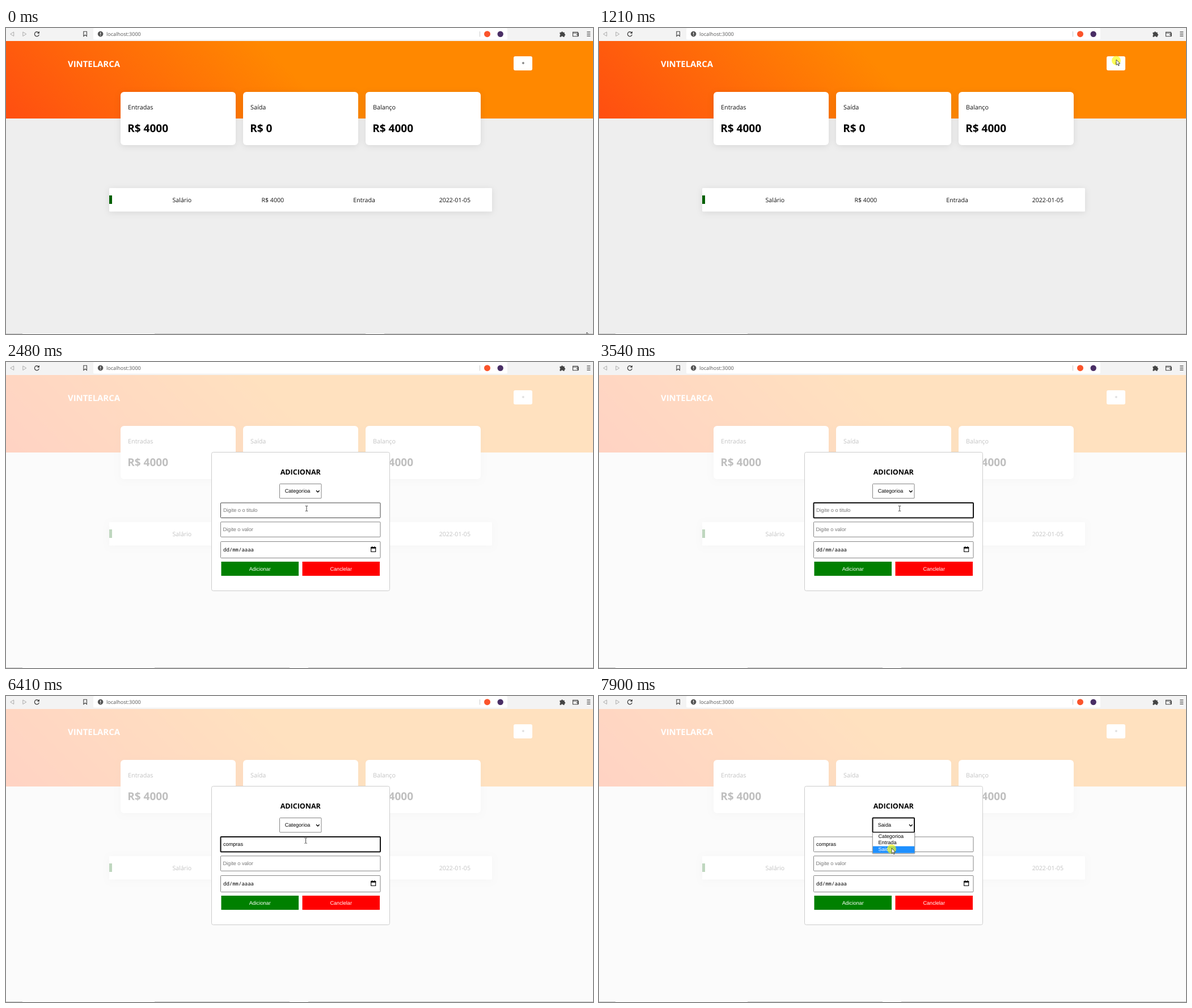
Animation, 1035 px wide and 541 px high, one loop 7990 ms. Source, as an HTML page:

```html
<!DOCTYPE html>
<html lang="pt">
<head>
<meta charset="utf-8">
<title>Finanças</title>
<style>
html, body { margin: 0; width: 100%; height: 100%; overflow: hidden; }
svg { display: block; width: 1035px; height: 541px; font-family: "Open Sans", "Noto Sans", sans-serif; text-rendering: geometricPrecision; }
.label { font-size: 10.8px; fill: #111; }
.value { font-size: 19px; font-weight: 700; }
.cell { font-size: 10.6px; fill: #111; }
.form { font: 9.15px "Liberation Sans", Arial, sans-serif; }
.hint { fill: #757575; }
.mid { text-anchor: middle; }
.field { fill: #fff; stroke: #858585; }
.field.hover { stroke: #444; }
.field.focus { stroke: #101010; stroke-width: 2; }
.card { fill: #fff; filter: drop-shadow(0 2px 6px rgba(0, 0, 0, .09)); }
.line { fill: none; stroke: #444; }
</style>
</head>
<body>
<svg viewBox="0 0 1035 541">
  <defs>
    <linearGradient id="sunset" gradientUnits="userSpaceOnUse" x1="224.5" y1="384.5" x2="810.5" y2="-201.5">
      <stop offset="0" stop-color="#ff4e11"/>
      <stop offset=".5" stop-color="#ff8800"/>
    </linearGradient>
  </defs>

  <!-- page -->
  <rect width="1035" height="541" fill="#eee"/>
  <rect y="23" width="1035" height="137" fill="url(#sunset)"/>
  <text x="109" y="68.5" font-size="14.9" font-weight="700" fill="#fff">VINTELARCA</text>
  <rect x="895" y="50" width="33" height="25" rx="3" fill="#fff"/>
  <text class="form mid" x="912" y="64.7">+</text>
  <g id="cards"></g>
  <rect class="card" x="182" y="283" width="675" height="41.5" rx="1.5"/>
  <rect x="182" y="296" width="5" height="15" fill="#006000"/>
  <g class="cell">
    <text x="293.5" y="308">Salário</text>
    <text x="450.5" y="308">R$ 4000</text>
    <text x="612.3" y="308">Entrada</text>
    <text x="763.7" y="308">2022-01-05</text>
  </g>

  <!-- dialog -->
  <g id="dialog">
    <rect y="23" width="1035" height="518" fill="#fff" opacity=".75"/>
    <rect x="362.5" y="159.5" width="314" height="245" rx="3" fill="#fff" stroke="#ccc"/>
    <text class="mid" x="519.3" y="199" font-size="12.5" font-weight="700">ADICIONAR</text>
    <rect id="select" class="field" x="482.5" y="215.5" width="73.5" height="25.5" rx="1"/>
    <text id="choice" class="form" x="491.7" y="231.3"></text>
    <path d="M547 227.3l2.8 2.8l2.8-2.8" class="line" style="stroke:#000;stroke-width:1.4"/>
    <rect id="input" class="field" x="378.5" y="249" width="281.5" height="26.5" rx="1"/>
    <text id="typed" class="form" x="383" y="265"></text>
    <rect id="caret" y="256.5" width="1" height="10.5"/>
    <rect class="field" x="378.5" y="282.8" width="281.5" height="26.5" rx="1"/>
    <text class="form hint" x="382.5" y="299">Digite o valor</text>
    <rect class="field" x="378.5" y="317.5" width="281.5" height="29" rx="1"/>
    <text x="383" y="334.7" style="font:9px 'Noto Sans Mono',monospace">dd/mm/aaaa</text>
    <path d="M643.7 327.7h8v7.8h-8z" class="line" style="stroke:#000;stroke-width:1.1"/>
    <path d="M643.2 327.2h9v2.6h-9zM645 326h1.2v1.5h-1.2zM649.2 326h1.2v1.5h-1.2z"/>
    <rect x="379.5" y="353" width="136.5" height="25" fill="#008000"/>
    <rect x="522.5" y="353" width="136.5" height="25" fill="#f00"/>
    <g class="form mid" fill="#fff">
      <text x="447.7" y="368.8">Adicionar</text>
      <text x="590.7" y="368.8">Canclelar</text>
    </g>
    <g id="menu">
      <rect x="482.5" y="241.5" width="74" height="36.5" fill="#fff" stroke="#8a8a8a" stroke-width=".8" style="filter:drop-shadow(0 1px 1px rgba(0,0,0,.3))"/>
      <rect id="mark" x="483" width="73.3" height="12" fill="#1e90ff"/>
      <g id="options" class="form">
        <text x="492.5" y="250.7">Categorioa</text>
        <text x="492.5" y="262.3">Entrada</text>
        <text x="492.5" y="274">Saida</text>
      </g>
    </g>
  </g>

  <!-- window edge -->
  <rect y="540" width="1035" height="1" fill="#c9c9c9"/>
  <rect x="29" y="540" width="233" height="1" fill="#fff"/>
  <rect id="gap" y="540" width="33" height="1" fill="#fff"/>

  <!-- browser bar -->
  <rect width="1035" height="23" fill="#f3f3f3"/>
  <rect x="154" width="730" height="20.5" rx="2" fill="#fff"/>
  <g class="line">
    <path d="M13.7 7v7.4l-6-3.7zM29.8 7v7.4l6-3.7z" stroke="#aaa"/>
    <path d="M57.4 8.1a4 4 0 1 0 .9 3.6" stroke-width="1.3"/>
    <path d="M136.8 6.3h5.6v8.2l-2.8-2.2l-2.8 2.2z" stroke-width="1.1"/>
    <path d="M835.5 6v9.5" stroke="#ccc"/>
    <path d="M1000 7.2h8.2v7.5h-8.700v-7.500zM1000 9h9.300v5.700M1005.500 11.800h3.800" stroke-width="1.100"/>
    <path d="M1024.300 7.200h6M1024.300 10.700h6M1024.300 14.200h6" stroke-width="1.200"/>
  </g>
  <path d="M58.900 5.800v4h-4z" fill="#333"/>
  <circle cx="166.600" cy="10.600" r="4.800" fill="#555"/>
  <path d="M166.600 7.700v3.500M166.600 12.300v1.300" stroke="#fff" stroke-width="1.200"/>
  <text x="177" y="14" font-size="9" fill="#555">localhost:3000</text>
  <circle cx="848.500" cy="10.700" r="5.500" fill="#fb542b"/>
  <circle cx="871.700" cy="10.700" r="5.200" fill="#4a2f66"/>
  <path d="M976.500 7.800h2.500a1.500 1.500 0 0 1 3 0h2.700v2.700a1.500 1.500 0 0 1 0 3v2.300h-2.700a1.500 1.500 0 0 0-3 0h-2.500v-2.700a1.500 1.500 0 0 0 0-2.700z" fill="#444"/>

  <g id="pointer">
    <circle id="halo" cy="1.500" r="8" fill="#ff0" opacity=".65"/>
    <path id="arrow" d="M0 0v9.500l2.200-2.100l1.600 3.400l1.400-.6l-1.500-3.300h3z" fill="#fff" stroke="#222" stroke-width=".8"/>
    <path id="beam" class="line" d="M-2.200-4.500h1.500l.7.600l.7-.6h1.500M0-4v8M-2.200 4.500h1.500l.7-.6l.7.600h1.500"/>
  </g>
</svg>
<script>
const $ = id => document.getElementById(id);
const LOOP = 7990;
const OPEN = 1280, FOCUS = 2990, BLUR = 6930, MENU = 7000, PICK = 7900;
const word = "compras";
const keys = [4010, 4210, 4340, 4610, 5070, 5270, 5930];
const clicks = [[1140, OPEN], [FOCUS, 3140], [BLUR, 7090], [7840, LOOP]];

// start, end, number of steps, waypoints
const moves = [
  [70, 860, 13, [[1024, 538], [998, 440], [966, 335], [966, 200], [967, 76], [945, 42], [922, 50]]],
  [930, 1000, 2, [[922, 50], [912, 56]]],
  [1590, 1730, 3, [[912, 56], [790, 110], [700, 160], [638, 199]]],
  [1930, 2480, 9, [[638, 199], [595, 222], [550, 250], [530, 259]]],
  [6410, 6860, 7, [[530, 259], [525, 248], [519, 237]]],
  [7230, 7570, 6, [[519, 237], [516, 269]]]
];

$("cards").innerHTML = [["Entradas", "4000"], ["Saída", "0"], ["Balanço", "4000"]].map(([name, sum], i) => {
  const x = 202 + 216 * i;
  return `<rect class="card" x="${x}" y="113" width="203" height="94" rx="6"/>
    <text class="label" x="${x + 13}" y="144">${name}</text>
    <text class="value" x="${x + 12.3}" y="184.400">R$ ${sum}</text>`;
}).join("");

const show = (id, on) => $(id).style.display = on ? "" : "none";

function pointerAt(t) {
  const [start, end, steps, pts] = moves.filter(m => t >= m[0]).pop() || moves[0];
  if (t < start) return pts[0];
  const step = Math.min(steps, 1 + Math.floor((t - start) / (end - start) * (steps - 1) + 1e-6));
  const u = step / steps * (pts.length - 1);
  const i = Math.min(pts.length - 2, Math.floor(u));
  return pts[i].map((v, axis) => v + (pts[i + 1][axis] - v) * (u - i));
}

function draw(t) {
  const [x, y] = pointerAt(t);
  const open = t >= OPEN, menu = t >= MENU;
  const focus = t >= FOCUS && t < BLUR;
  const beam = open && !menu && y > 249 && x < 660;

  show("dialog", open);
  $("gap").setAttribute("x", open ? 500 : 634);
  show("gap", open || t < 930);

  const count = keys.filter(k => t >= k).length;
  const typed = $("typed");
  typed.textContent = word.slice(0, count) || "Digite o o titulo";
  typed.classList.toggle("hint", !count);
  $("input").setAttribute("class", "field" + (focus ? " focus" : beam ? " hover" : ""));
  const last = keys[count - 1] || 3060;
  show("caret", focus && (t - last) % 1000 < 480);
  const width = open && count ? typed.getComputedTextLength() : 0;
  $("caret").setAttribute("x", Math.floor(383 + width));

  $("select").classList.toggle("focus", t >= BLUR);
  $("choice").textContent = t >= PICK ? "Saida" : "Categorioa";
  show("menu", menu);
  const row = y < 254 ? 0 : y < 266 ? 1 : 2;
  $("mark").setAttribute("y", 242 + 11.800 * row);
  [...$("options").children].forEach((o, i) => o.setAttribute("fill", i === row ? "#fff" : "#000"));

  $("pointer").setAttribute("transform", `translate(${x} ${y})`);
  show("halo", clicks.some(([a, b]) => t >= a && t < b));
  show("beam", beam);
  show("arrow", !beam);
}

const begin = performance.now();
function tick() {
  draw((performance.now() - begin) % LOOP);
  requestAnimationFrame(tick);
}
tick();
</script>
</body>
</html>
```
